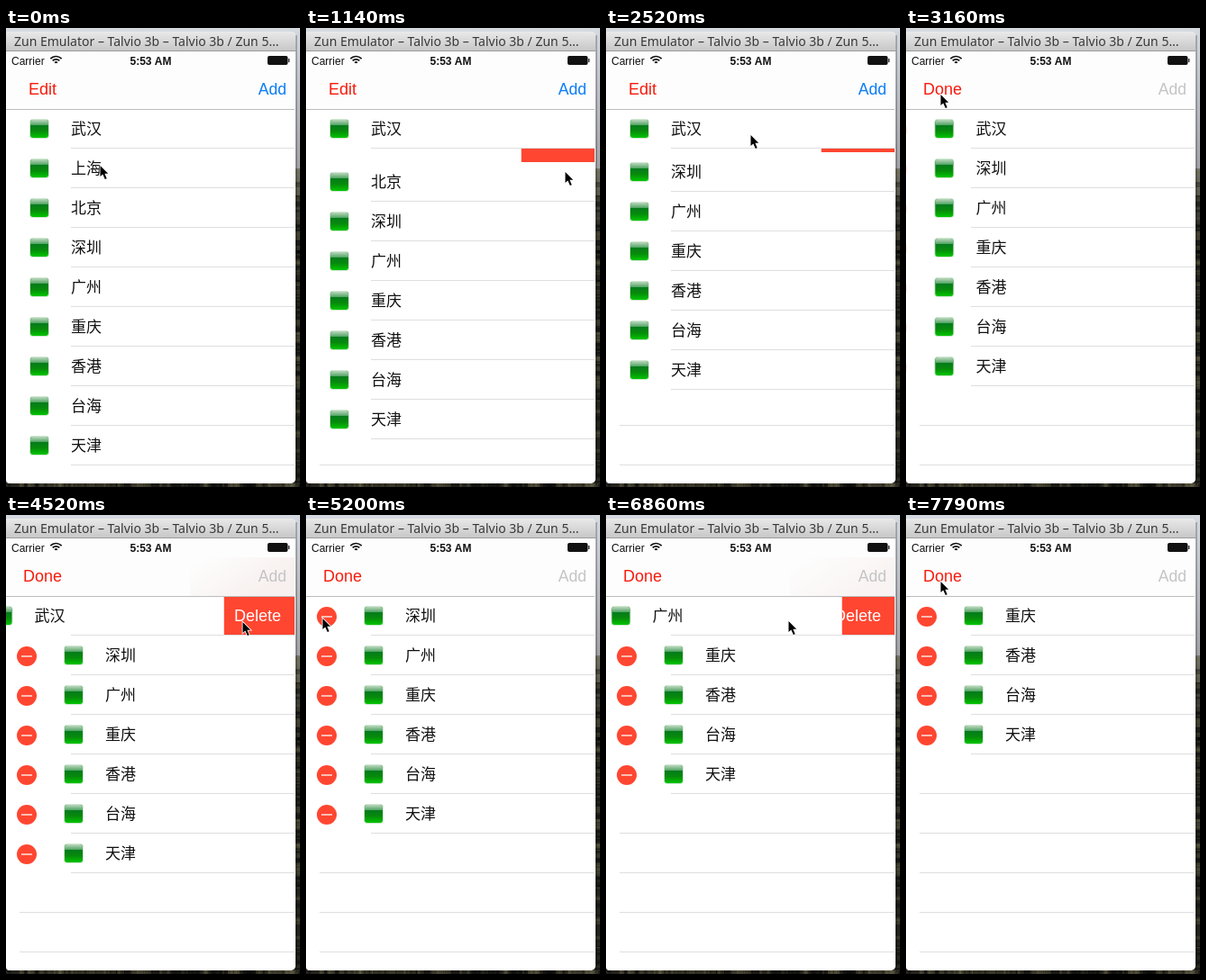
These frames come from a looping animation (326x510 px, 8000 ms). An HTML page with a canvas:

```html
<!DOCTYPE html>
<html lang="en">
<head>
<meta charset="utf-8">
<title>Editable city list</title>
<style>
  html, body { margin: 0; width: 100%; height: 100%; overflow: hidden; }
  canvas { display: block; width: 326px; height: 510px; }
</style>
</head>
<body>
<canvas id="stage" width="326" height="510"></canvas>
<script>
const c = document.getElementById('stage').getContext('2d');
const LOOP = 8000, TOP = 90, ROW = 44, RIGHT = 320, BUTTON = 81.5, INDENT = 38;
const COLLAPSE = 300, EDIT_AT = 3050, RED = '#ff4631', LINE = '#dfdfe1', INK = '#111';
const SANS = '"Liberation Sans", Arial, sans-serif';
const CJK = '"Noto Sans CJK SC", "Noto Sans CJK", sans-serif';
const CITIES = [...'武汉上海北京深圳广州重庆香港台海天津'.matchAll(/../g)].map(String);

// Rows removed by a swipe, then by the minus button in edit mode
const SWIPES = [
  { row: 1, open: 30, drop: 960, grip: [104, 152] },
  { row: 1, open: 1620, drop: 2275, grip: [70, 156] }
];
const TAPS = [
  { row: 0, open: 4050, drop: 4650 },
  { row: 0, open: 5400, drop: 5910 },
  { row: 0, open: 6680, drop: 7270 }
];
const REMOVALS = [...SWIPES, ...TAPS];

// The pointer rests at each stop and moves evenly between them
const stops = [];
function visit(arrive, leave, [x, y]) {
  stops.push({ t: arrive, x, y }, { t: leave, x, y });
}

function planPointer() {
  const edit = [38, 73], minus = [18, 114], edge = [310, 160];
  for (const { open, drop, grip } of SWIPES) {
    visit(open - 230, open - 230, edge);
    visit(open - 30, open + 150, grip);
    visit(open + 550, drop, [270, 158]);
  }
  let free = EDIT_AT + 290;
  visit(SWIPES[1].drop + 520, free, edit);
  for (const { open, drop } of TAPS) {
    visit(free + 330, open, minus);
    visit(open + 240, drop, [262, 118]);
    free = drop;
  }
  visit(free + 520, LOOP, edit);
}

const clamp = v => Math.max(0, Math.min(1, v));
const smooth = v => (v = clamp(v), v * v * (3 - 2 * v));
const noise = n => Math.abs(Math.sin(n * 127.1) * 43758.5) % 1;

function rect(x, y, w, h, fill) {
  c.fillStyle = fill;
  c.fillRect(x, y, w, h);
}

function round(x, y, w, h, r, fill) {
  c.beginPath();
  c.roundRect(x, y, w, h, r);
  c.fillStyle = fill;
  c.fill();
}

function text(s, x, y, font, fill, align = 'left') {
  c.font = font;
  c.fillStyle = fill;
  c.textAlign = align;
  c.fillText(s, x, y);
}

function clipped(x, y, w, h, paint) {
  c.save();
  c.beginPath();
  c.rect(x, y, w, h);
  c.clip();
  paint();
  c.restore();
}

function shade(y0, y1, ...colors) {
  const g = c.createLinearGradient(0, y0, 0, y1);
  colors.forEach((color, i) => g.addColorStop(i / (colors.length - 1), color));
  return g;
}

function desktop() {
  rect(0, 0, 326, 156, shade(0, 156, '#d5dae1', '#a2a3a7'));
  rect(0, 156, 326, 354, shade(156, 230, '#77776c', '#24231d'));
  for (let i = 0; i < 120; i++) {
    const tone = noise(i + .5) < .5 ? 'rgba(0,0,0,.35)' : 'rgba(110,106,78,.3)';
    rect(320, 158 + noise(i) * 350, 6, 1 + noise(i + .2) * 5, tone);
    rect(noise(i + .7) * 326, 506, 2 + noise(i + .3) * 8, 4, tone);
  }
  rect(321, 8, 2, 500, 'rgba(0,0,0,.22)');
  round(0, 4, 321, 502, [0, 5, 5, 4], '#fff');
  round(0, 4, 321, 22, [0, 5, 0, 0], shade(4, 26, '#e9e9e9', '#c6c6c6'));
  rect(0, 25, 321, 1, '#9c9c9c');
  text('Zun Emulator – Talvio 3b – Talvio 3b / Zun 5…', 9, 20, '14px "Noto Sans", sans-serif', '#383838');
}

function statusBar() {
  text('Carrier', 6, 41, '12px ' + SANS, INK);
  text('5:53 AM', 160.5, 41, 'bold 12px ' + SANS, INK, 'center');
  c.strokeStyle = INK;
  c.lineWidth = 1.7;
  for (const r of [8.5, 5.2, 1.9]) {
    c.beginPath();
    c.arc(55.5, 40, r, -Math.PI * .76, -Math.PI * .24);
    c.stroke();
  }
  round(290, 31, 22.5, 10, 2, INK);
  rect(313, 34, 1.5, 4, '#444');
}

function navBar(editing, tint) {
  rect(0, 26, RIGHT, 64, '#fdfdfd');
  const g = c.createLinearGradient(240, 35, 275, 90);
  g.addColorStop(0, 'rgba(247,240,238,0)');
  g.addColorStop(1, `rgba(247,240,238,${tint})`);
  rect(204, 47, 116, 43, g);
  rect(0, 90, RIGHT, 1, '#bcbcbe');
  text(editing ? 'Done' : 'Edit', 40.5, 74, '18px ' + SANS, '#f81a0c', 'center');
  text('Add', 311, 74, '17.5px ' + SANS, editing ? '#c4c4c6' : '#0b7cf5', 'right');
}

function icon(x, y) {
  round(x, y, 22, 22, 4, 'rgba(120,190,125,.35)');
  round(x + 1, y + 1, 20, 20, 3, shade(y + 6, y + 21, '#04791f', '#078a0c', '#00c400'));
  round(x + 1, y + 1, 20, 6, [3, 3, 0, 0], shade(y + 1, y + 7, '#bcd8be', '#4fa262'));
}

function minus(x, y, alpha) {
  c.globalAlpha = alpha;
  c.beginPath();
  c.arc(x, y, 11, 0, 7);
  c.fillStyle = RED;
  c.fill();
  rect(x - 6, y - .75, 12, 1.5, '#ffe3df');
  c.globalAlpha = 1;
}

function row(city, y, indent, slide) {
  const mid = y + 22, x = indent - slide;
  const shown = Math.min(slide, BUTTON), edge = RIGHT - shown;
  rect(0, y, RIGHT, ROW, '#fff');
  clipped(0, y, edge, ROW, () => {
    minus(x - 15, mid + 1, indent / INDENT);
    icon(26 + x, mid - 11);
    text(city, 72 + x, mid + 6, '300 17px ' + CJK, INK);
  });
  clipped(edge, y, shown, ROW, () => {
    rect(edge, y, shown, ROW, RED);
    text('Delete', 279, mid + 6, '18px ' + SANS, '#fff', 'center');
  });
  rect(72, y + 43, RIGHT - 72, 1, LINE);
}

// A swipe overshoots the button before it settles
function reveal(op, t) {
  const age = t - op.open;
  if (age <= 0) return 0;
  if (!op.grip) return BUTTON * (1 - Math.exp(-age / 143));
  return BUTTON * (1 - Math.exp(-age / 40)) + 60 * Math.exp(-(((age - 150) / 90) ** 2));
}

// Draws the rows and returns how strongly a red button shows through the bar
function list(t) {
  const cities = CITIES.slice();
  const op = REMOVALS.find(next => {
    if (t < next.drop + COLLAPSE) return true;
    cities.splice(next.row, 1);
  });
  const indent = INDENT * smooth((t - EDIT_AT - 40) / 300);
  const gone = op ? smooth((t - op.drop) / COLLAPSE) : 0;
  const slide = op ? reveal(op, t) + gone * 300 : 0;

  for (let i = cities.length - Math.ceil(gone); i < 9; i++) {
    rect(15, TOP + ROW * i + 43, RIGHT - 15, 1, LINE);
  }
  cities.forEach((city, i) => {
    const lift = op && i > op.row ? gone * ROW : 0;
    row(city, Math.round(TOP + ROW * i - lift), indent, op && i === op.row ? slide : 0);
  });
  return op && op.row === 0 ? clamp(slide / BUTTON) * (1 - gone * .4) : 0;
}

function pointer(t) {
  const i = stops.findIndex(s => s.t > t), a = stops[i - 1], b = stops[i];
  const k = (t - a.t) / (b.t - a.t);
  c.save();
  c.translate(Math.round(a.x + (b.x - a.x) * k), Math.round(a.y + (b.y - a.y) * k));
  const arrow = new Path2D('M.5 1V13L3.3 10.5L5.8 16L7.7 15.2L5.4 9.8H9.2Z');
  c.lineWidth = 1.6;
  c.strokeStyle = '#fff';
  c.stroke(arrow);
  c.fillStyle = '#000';
  c.fill(arrow);
  c.restore();
}

function draw(now) {
  const t = now % LOOP;
  desktop();
  c.save();
  c.beginPath();
  c.roundRect(0, 26, RIGHT, 480, [0, 0, 5, 4]);
  c.clip();
  const tint = list(t);
  navBar(t >= EDIT_AT, tint);
  statusBar();
  c.restore();
  pointer(t);
}

planPointer();
const start = performance.now();
function tick() {
  draw(performance.now() - start);
  requestAnimationFrame(tick);
}
tick();
</script>
</body>
</html>
```
